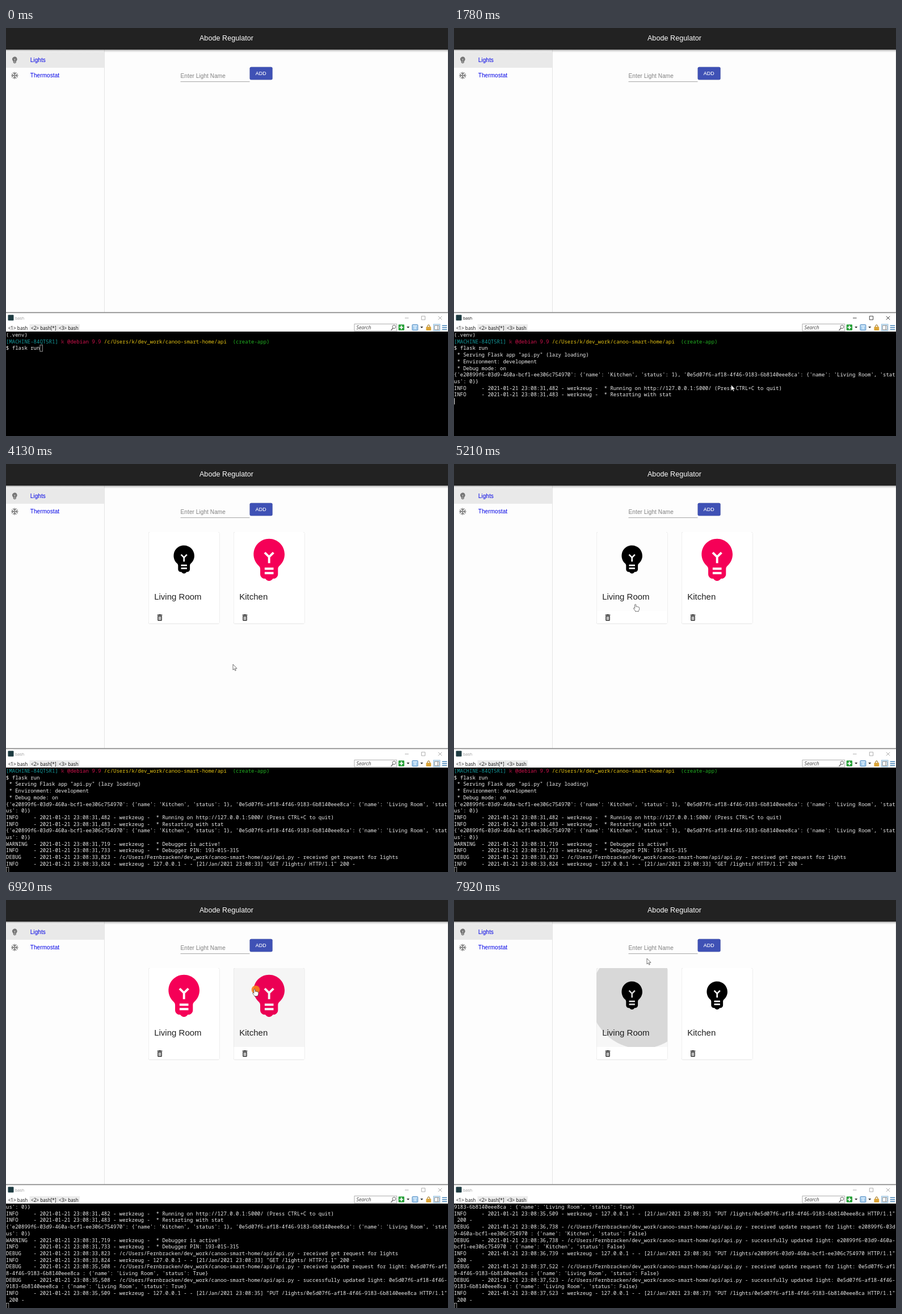
An HTML page that plays this animation: 779 px wide and 719 px high, repeating every 8 s.

```html
<!DOCTYPE html>
<html lang="en">
<head>
<meta charset="utf-8">
<title>Smart home demo</title>
<style>
  html, body { margin: 0; width: 100%; height: 100%; overflow: hidden; background: #fdfdfd; }
  svg { display: block; width: 779px; height: 719px; }
  text { font-family: 'Liberation Sans', Arial, sans-serif; white-space: pre; }
  .bar text { font-family: 'Open Sans', 'Noto Sans', sans-serif; font-size: 8.2px; fill: #111; }
  .bar .title { font-size: 7.1px; }
  .bar .search { font-size: 8.8px; font-style: italic; fill: #444; }
  #term text { font-family: 'Noto Sans Mono', 'DejaVu Sans Mono', monospace; font-size: 9.0167px; fill: #eee; }
  .link { font-size: 10px; letter-spacing: .094px; fill: #0000e6; }
  .card { filter: drop-shadow(0 .8px .7px rgba(0,0,0,.38)); }
</style>
</head>
<body>
<svg viewBox="0 0 779 719">
  <defs>
    <path id="bulb" d="M12 3c-.46 0-.93.04-1.4.14-2.76.53-4.96 2.76-5.48 5.52-.48 2.61.48 5.01 2.22 6.56.43.38.66.91.66 1.47V19c0 1.1.9 2 2 2h.28c.35.6.98 1 1.72 1s1.38-.4 1.72-1H14c1.1 0 2-.9 2-2v-2.31c0-.55.22-1.09.64-1.46C18.09 13.95 19 12.08 19 10c0-3.87-3.13-7-7-7zm2 16h-4v-1h4v1zm0-2h-4v-1h4v1zm-1.5-5.59V14h-1v-2.59L9.67 9.59l.71-.71L12 10.5l1.62-1.62.71.71-1.83 1.82z"/>
    <path id="snow" d="M22 11h-4.17l3.24-3.24-1.41-1.42L15 11h-2V9l4.66-4.66-1.42-1.41L13 6.17V2h-2v4.17L7.76 2.93 6.34 4.34 11 9v2H9L4.34 6.34 2.93 7.76 6.17 11H2v2h4.17l-3.24 3.24 1.41 1.42L9 13h2v2l-4.66 4.66 1.42 1.41L11 17.83V22h2v-4.17l3.24 3.24 1.42-1.41L13 15v-2h2l4.66 4.66 1.41-1.42L17.83 13H22z"/>
    <g id="trash" fill="#1c1c1c">
      <path d="M8 9h8v10H8z" opacity=".3"/>
      <path d="M16 9v10H8V9h8m-1.5-6h-5l-1 1H5v2h14V4h-3.5l-1-1zM18 7H6v12c0 1.1.9 2 2 2h8c1.1 0 2-.9 2-2V7z"/>
    </g>
    <linearGradient id="shade" x2="0" y2="1">
      <stop stop-opacity=".42"/><stop offset=".4" stop-opacity=".14"/><stop offset="1" stop-opacity="0"/>
    </linearGradient>
    <clipPath id="area"><path d="M0 139V2.5Q0 0 2.5 0H122.5Q125 0 125 2.5V139z"/></clipPath>
  </defs>

  <rect width="779" height="719" fill="#fdfdfd"/>
  <path d="M173.5 38V501M778.5 38V501" stroke="#e4e4e4"/>
  <rect y="42.5" width="173" height="27.5" fill="#e9e9e9"/>
  <rect y="38" width="779" height="5" fill="url(#shade)"/>
  <rect width="779" height="38" fill="#222"/>
  <text x="388.5" y="21.5" text-anchor="middle" font-size="12.5" letter-spacing=".09" fill="#fff">Abode Regulator</text>
  <g fill="#757575">
    <use href="#bulb" transform="translate(7.8 48.7) scale(.625)"/>
    <use href="#snow" transform="translate(7.8 76.2) scale(.625)"/>
  </g>
  <text class="link" x="42.7" y="59.7">Lights</text>
  <text class="link" x="42.7" y="87.2">Thermostat</text>
  <text x="307.6" y="88.4" font-size="10" letter-spacing=".094" fill="#808080">Enter Light Name</text>
  <path d="M307.5 94.6H429.5" stroke="#8f8f8f" stroke-width=".8"/>
  <g class="card"><rect x="429.6" y="68.7" width="40" height="22.6" rx="2.5" fill="#3f51b5"/></g>
  <text x="439.7" y="83" font-size="8.75" letter-spacing=".25" fill="#fff" stroke="#fff" stroke-width=".15">ADD</text>
  <g id="cards"></g>

  <g class="bar">
    <rect y="501" width="779" height="34" fill="#fff"/>
    <rect y="500.7" width="779" height="1.3" fill="#858585"/>
    <rect y="502" width="779" height="1" fill="#d5d5d5"/>
    <rect x="3.5" y="505.5" width="10" height="10" rx="1" fill="#1d3b41"/>
    <text class="title" id="title" x="16" y="513.6">bash</text>
    <g id="winBtns" fill="none" stroke-width=".8">
      <path d="M703 511.1h6.6M732.3 507.8h6.3v6.3h-6.3zM761.8 507.8l6.4 6.4M768.2 507.8l-6.4 6.4"/>
    </g>
    <rect x="41.5" y="522" width="88.5" height="13" fill="#ececec"/>
    <path d="M91 522.5V535" stroke="#ddd"/>
    <text x="3.7" y="532">&lt;1&gt; bash</text>
    <text x="44" y="532.4">&lt;2&gt; bash[*]</text>
    <text x="93" y="532.4">&lt;3&gt; bash</text>
    <rect x="614" y="521.7" width="74.8" height="12.2" fill="#fff" stroke="#999" stroke-width=".8"/>
    <text class="search" x="617.5" y="531">Search</text>
    <path d="M682 529l-3.4 3.6" stroke="#555" stroke-width="1.2"/>
    <circle cx="684" cy="526.6" r="2.9" fill="none" stroke="#555" stroke-width=".9"/>
    <rect x="691.7" y="522.4" width="10.3" height="10.3" rx="1" fill="#27a038"/>
    <path d="M696.8 524.3v6.6M693.5 527.6h6.6" stroke="#fff" stroke-width="1.8"/>
    <path d="M706.2 526.2h5l-2.5 2.8zM730.2 526.2h5l-2.5 2.8z" fill="#222"/>
    <rect x="715.9" y="522.7" width="10" height="10" rx="1" fill="#a9d0f0" stroke="#4a86bd" stroke-width=".9"/>
    <path d="M717.5 525h6.8M721 526.5v4.5" stroke="#fff" stroke-width="1.2"/>
    <path d="M742.8 527.5v-2.2q2-4.2 4 0v2.2" fill="none" stroke="#a8843c" stroke-width="1.2"/>
    <rect x="740.4" y="526.6" width="8.8" height="6.4" rx=".8" fill="#dca538"/>
    <rect x="753.4" y="522" width="11.6" height="11.6" fill="#d3e8f7" stroke="#84b4d8" stroke-width=".8"/>
    <path d="M755.3 524.3h7.8v7.4h-7.8zM760.6 524.3v7.4" fill="#fff" stroke="#777" stroke-width=".8"/>
    <path d="M768.6 524.6h8.6M768.6 528h8.6M768.6 531.4h8.6" stroke="#3f7fb5" stroke-width="1.5"/>
  </g>

  <g id="term">
    <rect y="535" width="779" height="184"/>
    <g id="rows"></g>
    <rect id="caret" height="11.2"/>
  </g>

  <circle id="click" r="7.3" fill="#f5821a" fill-opacity=".9"/>
  <g id="mouse" fill="#fff" stroke="#2b2b2b" stroke-width=".65" stroke-linejoin="round">
    <path id="arrow" d="M0 0V9.9L2.3 7.8L3.8 11.3L5.3 10.6L3.9 7.3H7z"/>
    <path id="hand" d="M-1.1 .7Q0 -.6 1.1 .7V4.2Q2.2 3.6 3.2 4.5Q4.3 4 5.2 5Q6.8 4.7 6.9 6.2V8.6Q6.8 10.6 5.6 11.4V12.6H-.2V11.6L-3.3 7.6Q-3.4 6.2 -2 6.4L-1.1 7.3z"/>
  </g>
</svg>

<script>
const LOOP = 8000, COLS = 144, ROWS = 16, CHAR = 5.41, PITCH = 11.68;
const $ = id => document.getElementById(id);
const clamp = v => Math.max(0, Math.min(1, v));
const smooth = v => (v = clamp(v), v * v * (3 - 2 * v));
const within = (t, spans) => spans.some(([a, b]) => t >= a && t < b);

// Terminal log
const KITCHEN = 'e20899f6-03d9-460a-bcf1-ee306c754970';
const LIVING = '0e5d07f6-af18-4f46-9183-6b8140eee8ca';
const API = '/c/Users/Fernbracken/dev_work/canoo-smart-home/api/api.py';
const log = (level, time, text) => `${level.padEnd(9)}- 2021-01-21 23:08:${time} - ${text}`;
const served = (time, request) =>
  log('INFO', time, `werkzeug - 127.0.0.1 - - [21/Jan/2021 23:08:${time.slice(0, 2)}] "${request} HTTP/1.1" 200 -`);
const lights = `{'${KITCHEN}': {'name': 'Kitchen', 'status': 1}, '${LIVING}': {'name': 'Living Room', 'status': 0}}`;
const update = (id, name, status, t1, t2, t3) => {
  const tail = `${id} : {'name': '${name}', 'status': ${status}}`;
  return [
    log('DEBUG', t1, `${API} - received update request for light: ${tail}`),
    log('DEBUG', t2, `${API} - successfully updated light: ${tail}`),
    served(t3, `PUT /lights/${id}`)
  ];
};
const prompt = [
  ['[MACHINE-84QT5R1]', '#159a9c'], [' k', '#a3123f'], [' @debian 9.9', '#d3124e'],
  [' /c/Users/k/dev_work/canoo-smart-home/api', '#e6c414'], ['  (create-app)', '#22b322']
];
const output = [
  [0, ['(.venv)', prompt, '$ flask run']],
  [1780, [' * Serving Flask app "api.py" (lazy loading)', ' * Environment: development', ' * Debug mode: on', lights,
    log('INFO', '31,482', 'werkzeug -  * Running on http://127.0.0.1:5000/ (Press CTRL+C to quit)'),
    log('INFO', '31,483', 'werkzeug -  * Restarting with stat')]],
  [2010, [lights, log('WARNING', '31,719', 'werkzeug -  * Debugger is active!'),
    log('INFO', '31,733', 'werkzeug -  * Debugger PIN: 193-015-315')]],
  [4130, [log('DEBUG', '33,823', `${API} - received get request for lights`), served('33,824', 'GET /lights/')]],
  [5680, update(LIVING, 'Living Room', 'True', '35,508', '35,508', '35,509')],
  [6990, update(KITCHEN, 'Kitchen', 'False', '36,738', '36,738', '36,739')],
  [7770, update(LIVING, 'Living Room', 'False', '37,522', '37,523', '37,523')]
];
const wrap = line => Array.isArray(line) ? [line] : line.match(new RegExp(`.{1,${COLS}}`, 'g'));
const lines = output.flatMap(([at, list]) => list.flatMap(wrap).map(text => ({ at, text })));

const svgEl = (tag, attrs, parent) => {
  const el = document.createElementNS('http://www.w3.org/2000/svg', tag);
  for (const k in attrs) el.setAttribute(k, attrs[k]);
  return parent.appendChild(el);
};
const set = (el, attrs) => { for (const k in attrs) el.setAttribute(k, attrs[k]); };
const show = (el, on) => { el.style.display = on ? '' : 'none'; };

const rows = Array.from({ length: ROWS }, (_, i) => svgEl('text', { x: 0, y: 544.1 + i * PITCH }, $('rows')));
let shown = -1;
function drawRows(count, top) {
  if (count === shown) return;
  shown = count;
  rows.forEach((row, i) => {
    const line = top + i < count ? lines[top + i].text : '';
    row.textContent = '';
    if (typeof line === 'string') row.textContent = line;
    else for (const [text, fill] of line)
      svgEl('tspan', { style: `fill:${fill}` }, row).textContent = text;
  });
}

// Light cards; clicks are [time, x, y] inside the card
const cards = [
  { name: 'Living Room', x: 251.2, on: [[5680, 7770]], hover: [[5150, 6370], [7470, 7840]],
    clicks: [[5680, 60, 68], [7690, 79, 52]] },
  { name: 'Kitchen', x: 401.2, on: [[0, 6990]], hover: [[6500, 7430]], clicks: [[6900, 37, 38]] }
];
for (const card of cards) {
  const g = svgEl('g', { transform: `translate(${card.x} 120)` }, $('cards'));
  svgEl('rect', { class: 'card', width: 125, height: 161.5, rx: 2.5, fill: '#fff' }, g);
  card.bulb = svgEl('use', { href: '#bulb' }, g);
  svgEl('text', { x: 10, y: 118.9, 'font-size': 15, fill: '#212121' }, g).textContent = card.name;
  svgEl('use', { href: '#trash', transform: 'translate(12.3 143) scale(.625)' }, g);
  const area = svgEl('g', { 'clip-path': 'url(#area)' }, g);
  card.shade = svgEl('rect', { width: 125, height: 139 }, area);
  card.ripple = svgEl('circle', {}, area);
}
function drawCard(card, t) {
  const on = within(t, card.on), size = on ? 93.75 : 62.5;
  set(card.bulb, {
    fill: on ? '#f50057' : '#000',
    transform: `translate(${62.5 - size / 2} ${46.9 - size / 2}) scale(${size / 24})`
  });
  const hover = Math.max(...card.hover.map(([a, b]) => smooth((t - a) / 250) * (1 - smooth((t - b) / 250))));
  set(card.shade, { opacity: .04 * hover });
  const click = card.clicks.filter(c => c[0] <= t).pop();
  show(card.ripple, click);
  if (!click) return;
  const [at, x, y] = click, age = t - at;
  const reach = Math.hypot(Math.max(x, 125 - x) + 1, Math.max(y, 139 - y) + 1);
  set(card.ripple, {
    cx: x, cy: y, r: reach * smooth(age / 340),
    opacity: .125 * clamp(age / 200) * (1 - clamp((age - 250) / 550))
  });
}

// Pointer stops: time, x, y
const path = [
  [40, 560, 724], [450, 488.5, 629], [1950, 488.5, 629], [2240, 400, 353], [4649, 400, 353],
  [4650, 399.5, 352.5], [4770, 399.5, 352.5], [5130, 334, 262], [5370, 280, 206], [5530, 311, 187.5],
  [5900, 311, 187.5], [6840, 438, 157], [7340, 438, 157], [7540, 330, 172], [7690, 330, 172],
  [7920, 340, 103], [8000, 342, 96]
];
const presses = [[5610, 5680], [6840, 6980], [7690, 7760]];
function pointer(t) {
  const i = path.findIndex(p => p[0] > t);
  if (i < 1) return path[0].slice(1);
  const [t0, x0, y0] = path[i - 1], [t1, x1, y1] = path[i], k = smooth((t - t0) / (t1 - t0));
  return [x0 + (x1 - x0) * k, y0 + (y1 - y0) * k];
}

function draw(t) {
  const active = t >= 380 && t < 2560;
  const ink = active ? '#111' : '#999';
  $('title').style.fill = ink;
  set($('winBtns'), { stroke: ink });

  const count = lines.filter(l => l.at <= t).length;
  const typing = t < 1310;
  const top = Math.max(0, count + 1 - ROWS);
  drawRows(count, top);
  const cx = typing ? 11 * CHAR : 0, cy = 535.4 + (count - top - (typing ? 1 : 0)) * PITCH;
  set($('caret'), active
    ? { x: typing ? cx - .8 : 0, y: cy, width: 1.1, fill: '#ddd', stroke: 'none' }
    : { x: cx + .4, y: cy, width: 4.4, fill: 'none', stroke: '#bbb', 'stroke-width': .8 });
  show($('caret'), !within(t, [[930, 1310]]));

  show($('cards'), t >= 4130);
  cards.forEach(card => drawCard(card, t));

  const [x, y] = pointer(t), hand = cards.some(c => within(t, c.hover));
  set($('mouse'), { transform: `translate(${x} ${y})` });
  show($('arrow'), !hand);
  show($('hand'), hand);
  set($('click'), { cx: x + 2, cy: y + 1 });
  show($('click'), within(t, presses));
}

const start = performance.now();
function tick() {
  draw((performance.now() - start) % LOOP);
  requestAnimationFrame(tick);
}
tick();
</script>
</body>
</html>
```
